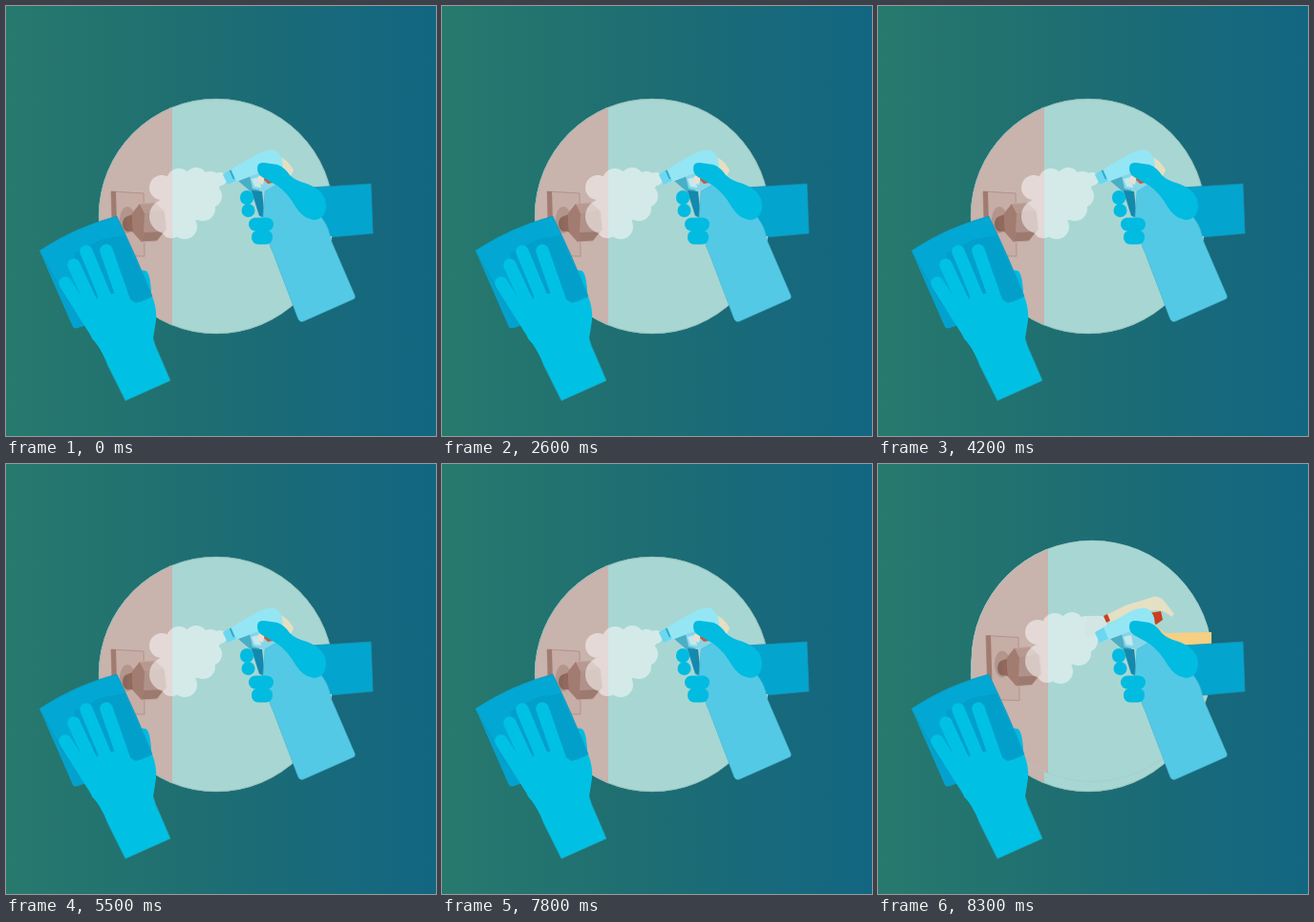
Recreate the animation shown at these times as an HTML page. Size 450 px wide and 450 px high, loop 10000 ms.

```html
<!DOCTYPE html>
<html lang="en">
<head>
<meta charset="utf-8">
<title>Door knob cleaning</title>
<style>
html, body { margin: 0; width: 100%; height: 100%; overflow: hidden; background: #1f6c73; }
svg { display: block; width: 100%; height: 100%; }
</style>
</head>
<body>
<svg viewBox="0 0 450 450">
  <defs>
    <linearGradient id="bg">
      <stop offset="0" stop-color="#28796d"/>
      <stop offset=".45" stop-color="#1e6e72"/>
      <stop offset=".75" stop-color="#18697b"/>
      <stop offset="1" stop-color="#126681"/>
    </linearGradient>
    <clipPath id="lowDisc"><circle cx="220" cy="220" r="123"/></clipPath>
    <clipPath id="highDisc"><circle cx="224" cy="206.3" r="126.3"/></clipPath>
    <g id="knob">
      <path d="M110 194L144 196L145 262L112 261Z" fill="#c6ada6" stroke="#ab8d83" stroke-width=".8"/>
      <path d="M110 194L115 194L117 260L112 261Z" fill="#a07b6f"/>
      <ellipse cx="127" cy="224" rx="8" ry="14" fill="#b3958c"/>
      <ellipse cx="128" cy="228" rx="6" ry="8" fill="#8a675c"/>
      <path d="M127 220L138 216V239L127 234Z" fill="#93695c"/>
      <path d="M132 217L140 207L156 206L166 215L168 234L158 246L142 247L133 237Z" fill="#b0928a"/>
      <path d="M132 217L140 207L145 217L144 237L142 247L133 237Z" fill="#a27c70"/>
      <path d="M140 207L156 206L163 214L145 217Z" fill="#b79990"/>
      <path d="M144 237L165 236L158 246L142 247Z" fill="#9d7a6f"/>
      <path d="M140 207L156 206L166 215L168 234L158 246L142 247" fill="none" stroke="#c5aaa2" stroke-width="1"/>
    </g>
    <g id="cloud" fill="#fff" opacity=".5"></g>
  </defs>

  <rect width="450" height="450" fill="url(#bg)"/>
  <g clip-path="url(#lowDisc)">
    <rect x="90" y="80" width="270" height="270" fill="#a8d6d3"/>
    <rect x="90" y="80" width="84" height="270" fill="#c9b3ad"/>
  </g>
  <circle cx="220" cy="220" r="122.700" fill="none" stroke="#92bbb8" stroke-width=".8"/>

  <g id="low">
    <use href="#knob"/>
    <use href="#cloud"/>
  </g>
  <g id="high">
    <g clip-path="url(#highDisc)">
      <rect x="90" y="75" width="270" height="270" fill="#a8d6d3"/>
      <rect x="90" y="75" width="88" height="270" fill="#c9b3ad"/>
    </g>
    <circle cx="224" cy="206.3" r="126" fill="none" stroke="#a3c9c6" stroke-width=".6"/>
    <use href="#knob" x="3" y="-14.5"/>
    <use href="#cloud" x="4" y="-14"/>
    <path d="M218 160Q232 157 241 161L240 168L229 179L217 181Z" fill="#d3e6e4"/>
    <path d="M272 167L286 166L301 177L349 176V188L326 190L296 186Z" fill="#f6cf83"/>
  </g>

  <path d="M318 190L382 186L384 238L340 242L328 222Z" fill="#03a5cf" stroke="#1a8fad" stroke-width=".7"/>
  <path id="glint" d="M335 241L341 241L339 246Z" fill="#d4eced"/>

  <!-- trigger and bottle -->
  <path d="M243 183L259 177L265 192L270 222L265 220L257 195Z" fill="#4aaec6"/>
  <path d="M257 193L268 194L271 222L265 219Z" fill="#1489ad"/>
  <path d="M255 178L277 172L287 188L271 194L258 191Z" fill="#86d6e8"/>
  <path d="M257 181L265 179L267 190L260 189Z" fill="#c4e8ee"/>
  <path d="M271 194L285 186L312 195L332 224Q338 232 340 245L365 303Q366 306 363 307L311 330Q308 331 306 328L279 257Q273 246 276 236L269 221Z" fill="#53c9e5" stroke="#45b7d2" stroke-width=".6"/>

  <g id="lowHead">
    <path d="M281 157Q294 158 301 172L298 178L284 169Z" fill="#e4dfc3"/>
    <path d="M268 180L281 177L285 184L274 186Z" fill="#c9593d"/>
    <path d="M264 178L271 177L269 187L264 185Z" fill="#eadfce"/>
  </g>
  <g id="highHead">
    <path d="M237 159L259 148L288 139Q295 138 300 144L310 157L307 160Q300 153 292 153L267 155L242 166Z" fill="#e4e0c4"/>
    <path d="M236 159L240 157L243 164L239 166Z M284 156L296 154L298 163L291 168L285 164Z" fill="#c8401f"/>
  </g>
  <path d="M227 177L242 167L263 155Q273 150 281 151Q287 154 289 161L290 168L264 175L238 185L232 187Z" fill="#94e6f5"/>
  <path d="M227 176L236 171L241 183L232 187Z" fill="#6cd7ef"/>
  <path id="slit" d="M234.500 172L238.500 181" stroke="#27a5be" stroke-width="1.600"/>

  <!-- spraying hand -->
  <g fill="#02bbe0">
    <path d="M263 170Q263 163 270 164L284 166Q292 169 297 177Q303 183 315 186Q334 193 335 208Q335 223 322 224Q310 222 303 210Q295 196 284 188L268 179Q263 176 263 170Z"/>
    <rect x="245" y="193" width="14" height="15" rx="7"/>
    <rect x="246.500" y="207" width="14" height="14" rx="7"/>
    <rect x="254" y="221.500" width="26" height="14" rx="7"/>
    <rect x="257" y="234.500" width="22" height="15" rx="7"/>
  </g>

  <!-- wiping hand -->
  <path d="M136 282Q139 275 146 277Q151 279 152 300L157 324L138 310Z" fill="#00bbe0"/>
  <path d="M35 256L70 336Q71 338 75 337L93 331L87 275Z" fill="#03a2ce"/>
  <path d="M35 256Q73 231 116 220Q136 261 153 304L134 312L65 310Z" fill="#02a8d3" stroke="#1690b3" stroke-width=".6"/>
  <path d="M71 259L100 244L124 240L152 303L130 312L80 300Z" fill="#029fcb"/>
  <path d="M62 290L96 344M71 271L101 336M84 257L112 324M105 256L126 316" fill="none" stroke="#00c1e4" stroke-width="13.500" stroke-linecap="round"/>
  <path d="M82 326L98 303L118 300L136 311Q147 309 153 304Q158 316 157 329L154 348Q156 356 160 364L172 392L125 413L106 375Q99 357 90 348Z" fill="#00c1e4"/>
  <path d="M154 348Q156 356 160 364L172 392L125 413L106 375" fill="none" stroke="#209fb8" stroke-width=".7"/>
</svg>
<script>
const LOOP = 10000, SWITCH = 8000;
const el = id => document.getElementById(id);
const puffs = [
  [163, 190, 13], [181, 183, 13], [199, 181, 12], [214, 184, 11], [224, 181, 7],
  [214, 199, 12], [206, 212, 13], [188, 204, 23], [168, 220, 18], [187, 231, 13], [173, 232, 11]
];
el('cloud').innerHTML = puffs.map(([x, y, r]) => `<circle cx="${x}" cy="${y}" r="${r}"/>`).join('');

function show(ids, on) {
  for (const id of ids) el(id).style.display = on ? '' : 'none';
}

function render(ms) {
  const raised = ms % LOOP >= SWITCH;
  show(['low', 'lowHead', 'glint', 'slit'], !raised);
  show(['high', 'highHead'], raised);
}

const start = performance.now();
function tick() {
  render(performance.now() - start);
  requestAnimationFrame(tick);
}
tick();
</script>
</body>
</html>
```
